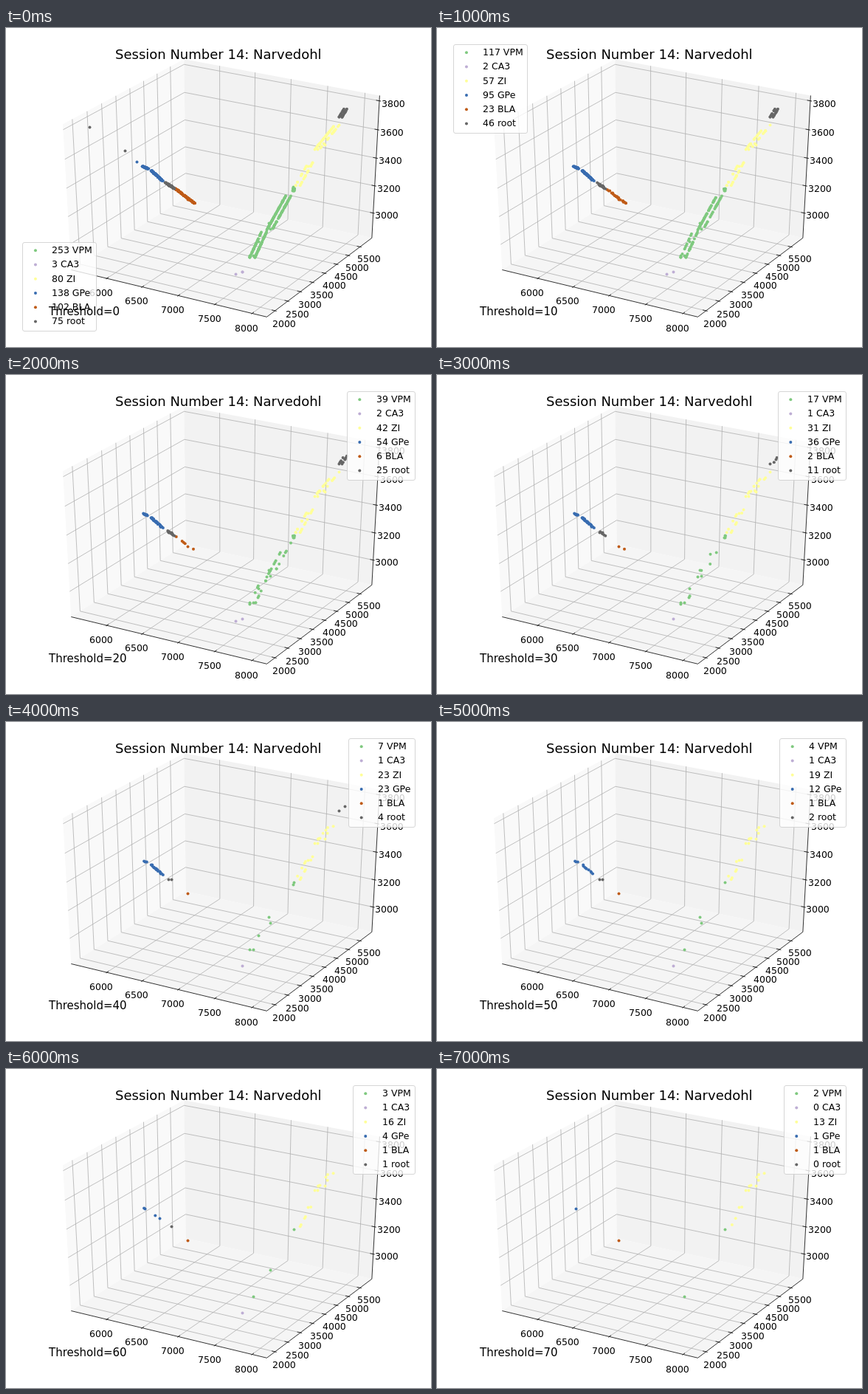
Write an HTML page with a canvas that moves like this. It is 576 by 432 pixels and loops after 8000 ms.

```html
<!DOCTYPE html>
<html>
<head>
<meta charset="utf-8">
<style>
html, body { margin: 0; width: 100%; height: 100%; overflow: hidden; background: #fff; }
canvas { display: block; }
</style>
</head>
<body>
<canvas id="stage" width="576" height="432"></canvas>
<script>
const ctx = document.getElementById('stage').getContext('2d');
const STEP_MS = 1000, STEPS = 8;
const SMALL = 12.5, MEDIUM = 15, LARGE = 18;
const plot = { left: 16.2, top: 16.2, right: 559.8, bottom: 415.8 };

const random = seed => {
  const v = Math.sin(seed * 12.9898) * 43758.5453;
  return v - Math.floor(v);
};

// counts: points per step. keys: the longest-lasting points.
// runs: [x1, y1, x2, y2, spread], two columns of sites the other points fall on.
// strays: outliers of the first step.
const groups = [
  { name: 'VPM', color: '#7fc97f', counts: [253, 117, 39, 17, 7, 4, 3, 2],
    keys: [[390, 217], [335, 308], [358, 272], [356, 264], [389, 220], [342, 289], [330, 308]],
    runs: [[382, 227, 357, 272, 3.5], [349, 276, 333, 311, 3.5], [390, 215, 389, 220, 1]] },
  { name: 'CA3', color: '#beaed4', counts: [3, 2, 2, 1, 1, 1, 1, 0],
    keys: [[320, 330], [311, 333]], runs: [[320, 330, 321, 327, 0]] },
  { name: 'ZI', color: '#ffff99', counts: [80, 57, 42, 31, 23, 19, 16, 13],
    keys: [[433, 146], [432, 158], [425, 157], [422, 164], [409, 187]],
    runs: [[448, 131, 421, 164, 3], [412, 182, 395, 213, 3]] },
  { name: 'GPe', color: '#386cb0', counts: [138, 95, 54, 36, 23, 12, 4, 1],
    keys: [[188, 189], [208, 202]],
    runs: [[185, 187, 192, 190, .7], [197, 193, 211, 206, .7]], strays: [[177, 181]] },
  { name: 'BLA', color: '#bf5b17', counts: [102, 23, 6, 2, 1, 1, 1, 1],
    keys: [[246, 232]], runs: [[229, 217, 255, 237, .7]] },
  { name: 'root', color: '#666666', counts: [75, 46, 25, 11, 4, 2, 1, 0],
    keys: [[224, 213], [220, 213], [459, 114]],
    runs: [[216, 209, 228, 217, .7], [453, 120, 459, 110, 2]],
    strays: [[113, 134], [161, 166]] },
];

function sitePosition({ keys, runs }, i) {
  if (i < keys.length) return keys[i];
  const pitch = 2.5;
  const lengths = runs.map(([x1, y1, x2, y2]) => Math.hypot(x2 - x1, y2 - y1));
  let distance = random(i) * lengths.reduce((a, b) => a + b), r = 0;
  while (distance > lengths[r]) distance -= lengths[r++];
  const [x1, y1, x2, y2, spread] = runs[r];
  const t = Math.round(distance / pitch) * pitch / lengths[r];
  const column = random(i + 500) < .5 ? -spread : spread;
  return [x1 + (x2 - x1) * t + column, y1 + (y2 - y1) * t];
}

// Perspective view of the unit cube, azimuth -60 and elevation 30 degrees.
function project(x, y, z) {
  x -= .5; y -= .5; z -= .5;
  const depth = 10 - (.433 * x - .75 * y + .5 * z);
  return [295.35 + 2938.4 * (.866 * x + .5 * y) / depth,
    210.6 - 2160 * (-.25 * x + .433 * y + .866 * z) / depth];
}

function trace(points) {
  ctx.beginPath();
  for (const p of points) ctx.lineTo(...project(...p));
}

function line(color, ...points) {
  trace(points);
  ctx.strokeStyle = color;
  ctx.lineWidth = .8;
  ctx.stroke();
}

function pane(color, ...points) {
  trace(points);
  ctx.fillStyle = color;
  ctx.fill();
}

function text(str, x, y, size, centered) {
  ctx.font = `${size}px "DejaVu Sans", sans-serif`;
  if (centered) x -= ctx.measureText(str).width / 2;
  ctx.fillStyle = '#000';
  ctx.fillText(str, Math.round(x), Math.round(y));
}

function dot(x, y, color) {
  ctx.beginPath();
  ctx.arc(x, y, 2, 0, 7);
  ctx.fillStyle = color;
  ctx.fill();
}

// The panes lie slightly outside the data cube.
const LO = -1 / 48, HI = 49 / 48;

// at: point on the axis, moved out by a tick length or by the label padding.
const axes = [
  { first: 6000, gap: 500, n: 5, start: .176, step: .1925,
    at: (f, tick = 0, pad = 0) => [f, LO - tick - pad, LO - pad],
    grid: f => [[f, LO, LO], [f, HI, LO], [f, HI, HI]] },
  { first: 2000, gap: 500, n: 8, start: .055, step: .12,
    at: (f, tick = 0, pad = 0) => [HI + tick + pad, f, LO - pad],
    grid: f => [[HI, f, LO], [LO, f, LO], [LO, f, HI]] },
  { first: 3000, gap: 200, n: 5, start: .169, step: .2037,
    at: (f, tick = 0, pad = 0) => [HI + tick + pad, HI + pad, f],
    grid: f => [[LO, LO, f], [LO, HI, f], [HI, HI, f]] },
];

function drawAxes() {
  pane('#f9f9f9', [LO, LO, LO], [LO, HI, LO], [LO, HI, HI], [LO, LO, HI]);
  pane('#f2f2f2', [LO, HI, LO], [HI, HI, LO], [HI, HI, HI], [LO, HI, HI]);
  pane('#f5f5f5', [LO, LO, LO], [HI, LO, LO], [HI, HI, LO], [LO, HI, LO]);
  const ticks = a => Array.from({ length: a.n }, (_, i) => a.start + i * a.step);
  for (const a of axes) for (const f of ticks(a)) line('#b0b0b0', ...a.grid(f));
  for (const a of axes) {
    line('#000', a.at(LO), a.at(HI));
    ticks(a).forEach((f, i) => {
      line('#000', a.at(f, .0083), a.at(f, -.0167));
      const [x, y] = project(...a.at(f, 0, .0488));
      text(a.first + i * a.gap, x, y + 9.7, SMALL, true);
    });
  }
}

function drawPoints(step) {
  for (const g of groups) {
    const sites = Array.from({ length: g.counts[step] }, (_, i) => sitePosition(g, i));
    if (step === 0 && g.strays) sites.push(...g.strays);
    for (const [x, y] of sites) dot(x + .5, y + .5, g.color);
  }
}

function drawLegend(step) {
  const labels = groups.map(g => `${g.counts[step]} ${g.name}`);
  ctx.font = `${SMALL}px "DejaVu Sans", sans-serif`;
  const width = 45 + Math.max(...labels.map(s => ctx.measureText(s).width));
  const height = 119.25, margin = 6.25;
  const left = step < 2 ? plot.left + margin : plot.right - margin - width;
  const top = step === 0 ? plot.bottom - margin - height : plot.top + margin;
  const snap = v => Math.round(v) + .5;
  const x = snap(left), y = snap(top);
  ctx.beginPath();
  ctx.roundRect(x, y, snap(left + width) - x, snap(top + height) - y, 2.5);
  ctx.fillStyle = 'rgba(255,255,255,.8)';
  ctx.fill();
  ctx.strokeStyle = 'rgba(204,204,204,.8)';
  ctx.lineWidth = 1;
  ctx.stroke();
  labels.forEach((s, i) => {
    const row = top + i * 19.25;
    dot(left + 17.5, row + 10.9, groups[i].color);
    text(s, left + 40, row + 14.7, SMALL);
  });
}

function frame(now) {
  const step = Math.floor(now / STEP_MS) % STEPS;
  ctx.fillStyle = '#fff';
  ctx.fillRect(0, 0, 576, 432);
  drawAxes();
  drawPoints(step);
  text('Session Number 14: Narvedohl', 288, 42.2, LARGE, true);
  drawLegend(step);
  text(`Threshold=${step * 10}`, 57.6, 388.8, MEDIUM);
  requestAnimationFrame(frame);
}
frame(performance.now());
</script>
</body>
</html>
```
